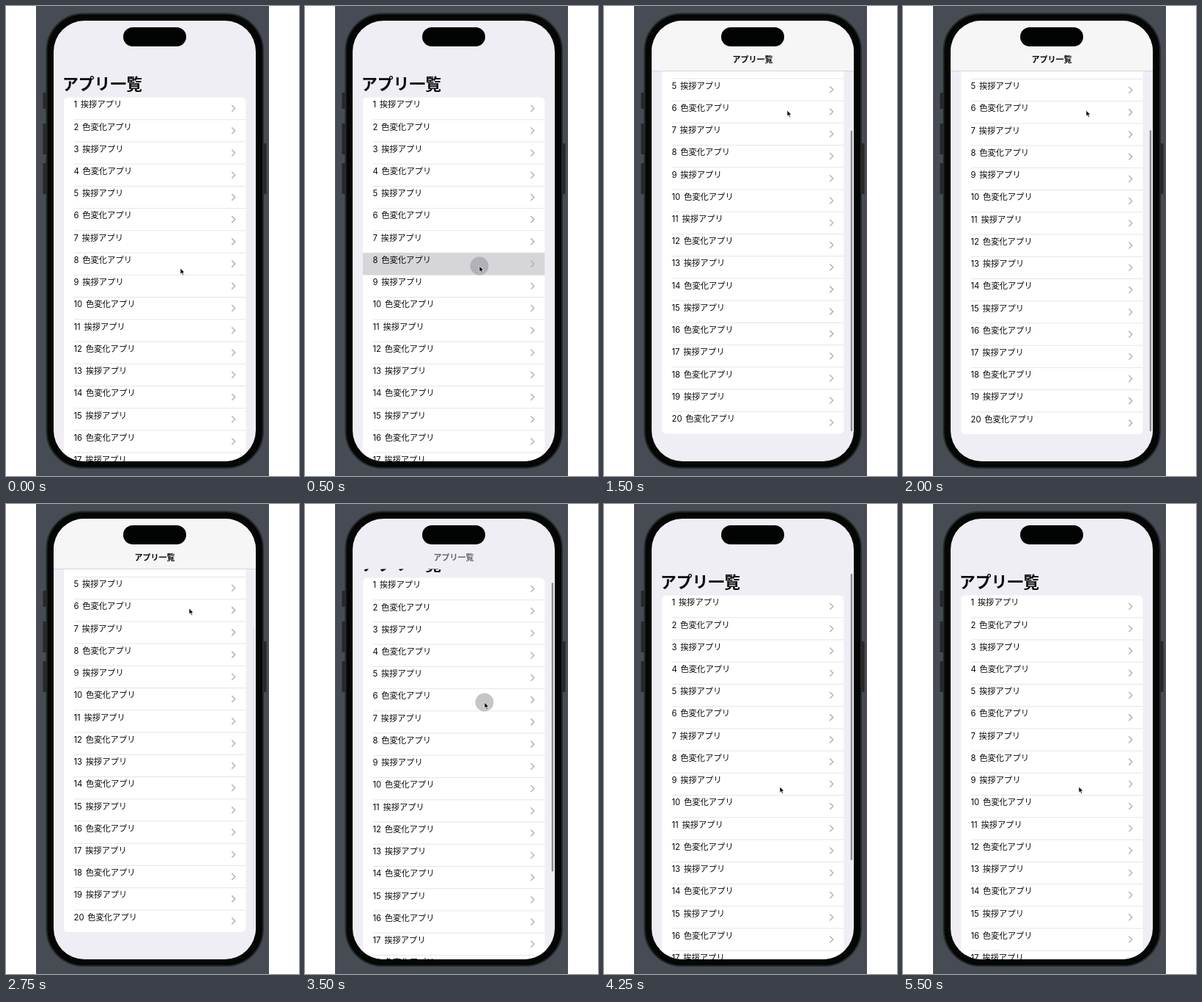
These frames come from a looping animation (400 by 640 pixels, 6 s). An HTML page:

```html
<!DOCTYPE html>
<html lang="ja">
<head>
<meta charset="utf-8">
<title>アプリ一覧</title>
<style>
  html, body { margin: 0; width: 100%; height: 100%; overflow: hidden; background: #fff; }
  svg { display: block; width: 400px; height: 640px; }
  text { font: 400 11.3px Inter, "Noto Sans CJK JP", "Noto Sans CJK", sans-serif; fill: #0a0a0a; }
  #largeTitle { font-size: 21.8px; font-weight: 700; }
  #smallTitle { font-size: 11px; font-weight: 700; text-anchor: middle; }
  .chevron { fill: none; stroke: #b4b4b8; stroke-width: 1.5; stroke-linecap: round; stroke-linejoin: round; }
  .line { stroke: #dfdfe2; stroke-width: .8; }
</style>
</head>
<body>
<svg viewBox="0 0 400 640">
  <defs>
    <clipPath id="screenClip"><rect x="65" y="20" width="276" height="600" rx="42"/></clipPath>
    <clipPath id="contentClip"><rect x="65" y="88.5" width="276" height="540"/></clipPath>
  </defs>

  <rect x="41" width="318" height="640" fill="#474b54"/>
  <g fill="#25282b">
    <rect x="50.5" y="118" width="6" height="22" rx="1"/>
    <rect x="50.5" y="160" width="6" height="42" rx="1"/>
    <rect x="50.5" y="214" width="6" height="42" rx="1"/>
    <rect x="349.5" y="187" width="6" height="69" rx="1"/>
  </g>
  <rect x="55.5" y="10.5" width="295.5" height="618.5" rx="50" fill="#050707" stroke="#252a2a" stroke-width="2"/>

  <g clip-path="url(#screenClip)">
    <rect x="65" y="20" width="276" height="600" fill="#f0eef5"/>
    <g clip-path="url(#contentClip)">
      <g id="content">
        <text id="largeTitle" x="77" y="113.5">アプリ一覧</text>
        <g id="list"></g>
      </g>
    </g>
    <g id="bar">
      <rect x="65" y="20" width="276" height="68.5" fill="#f6f6f7"/>
      <path d="M65 88.5H341" stroke="#d3d3d7" stroke-width=".9"/>
    </g>
    <text id="smallTitle" x="203" y="77.4">アプリ一覧</text>
    <rect id="thumb" x="336.7" width="2.4" rx="1.2" fill="#8b8b90"/>
  </g>
  <rect x="160" y="29" width="86" height="26" rx="13" fill="#020303"/>

  <g id="pointer">
    <circle id="touch" r="12.5" fill="#8e8e93" fill-opacity=".5"/>
    <path d="M0 0V8.2L1.9 6.5 3.2 9.5 4.6 8.9 3.3 6H5.9Z" fill="#000" stroke="#fff" stroke-width=".7"/>
  </g>
</svg>
<script>
const LOOP = 6000, STEP = 250;
const ROWS = 20, ROW_HEIGHT = 30.23, LIST_TOP = 124.5;
const PRESSED_ROW = 8;
const el = id => document.getElementById(id);

function buildList() {
  const height = ROWS * ROW_HEIGHT;
  let html = `<rect x="79" y="${LIST_TOP}" width="248.3" height="${height}" rx="6" fill="#fff"/>`;
  for (let i = 1; i <= ROWS; i++) {
    const y = LIST_TOP + (i - 1) * ROW_HEIGHT;
    const label = i % 2 ? "挨拶アプリ" : "色変化アプリ";
    if (i === PRESSED_ROW)
      html += `<rect id="highlight" x="79" y="${y}" width="248.3" height="${ROW_HEIGHT}" fill="#d6d5da"/>`;
    html += `<text x="92.5" y="${y + 13.8}">${i}<tspan dx="4.7">${label}</tspan></text>
      <path class="chevron" d="M308.7 ${y + 11}l4 4-4 4"/>`;
    if (i < ROWS) html += `<path class="line" d="M93 ${y + ROW_HEIGHT}H327.3"/>`;
  }
  el("list").innerHTML = html;
}

// Each entry holds from its time until the next one.
const base = { scroll: 0, x: 238, y: 357, touch: 0, pressed: 0, bar: 0, title: 0, thumb: 0 };
const atEnd = { scroll: 146, x: 250, y: 142, bar: 1, title: 1, thumb: 1 };
const atStart = { x: 240, y: 385, thumb: 1 };
const steps = [
  [0, {}],
  [250, { touch: 1 }],
  [500, { touch: 1, pressed: 1, y: 354 }],
  [750, { ...atEnd, scroll: 141, x: 246, y: 210, touch: 1 }],
  [1000, { ...atEnd, scroll: 175 }],
  [1250, { ...atEnd, scroll: 150 }],
  [1500, { ...atEnd, scroll: 146.6 }],
  [1750, atEnd],
  [2750, { ...atEnd, thumb: .1 }],
  [3000, { ...atEnd, thumb: 0 }],
  [3250, { ...atEnd, thumb: 0, touch: 1 }],
  [3500, { ...atStart, scroll: 24, x: 245, y: 270, touch: 1, title: .6 }],
  [3750, { ...atStart, scroll: -22 }],
  [4000, { ...atStart, scroll: -3 }],
  [4250, atStart],
  [5500, { ...atStart, thumb: 0 }],
].map(([time, state]) => [time, { ...base, ...state }]);

// The scroll thumb shrinks when the list is pulled past either end.
function thumbSpan(scroll) {
  const inside = Math.max(0, Math.min(146, scroll));
  const over = scroll - inside;
  return [95 + inside * 74 / 146 + Math.max(0, over), 485 + inside * 94 / 146 + Math.min(0, over)];
}

function draw(time) {
  const s = steps.findLast(([from]) => from <= time)[1];
  const [y1, y2] = thumbSpan(s.scroll);
  const zoom = 1 + Math.max(0, -s.scroll) / 1200;
  el("content").setAttribute("transform", `translate(0 ${-s.scroll})`);
  el("largeTitle").setAttribute("transform", `translate(77 113.5) scale(${zoom}) translate(-77 -113.5)`);
  el("pointer").setAttribute("transform", `translate(${s.x} ${s.y})`);
  el("thumb").setAttribute("y", y1);
  el("thumb").setAttribute("height", y2 - y1);
  el("thumb").style.opacity = s.thumb;
  el("touch").style.opacity = s.touch;
  el("highlight").style.opacity = s.pressed;
  el("bar").style.opacity = s.bar;
  el("smallTitle").style.opacity = s.title;
}

buildList();
const began = performance.now();
function tick() {
  const time = (performance.now() - began) % LOOP;
  draw(Math.floor(time / STEP) * STEP);
  requestAnimationFrame(tick);
}
tick();
</script>
</body>
</html>
```
